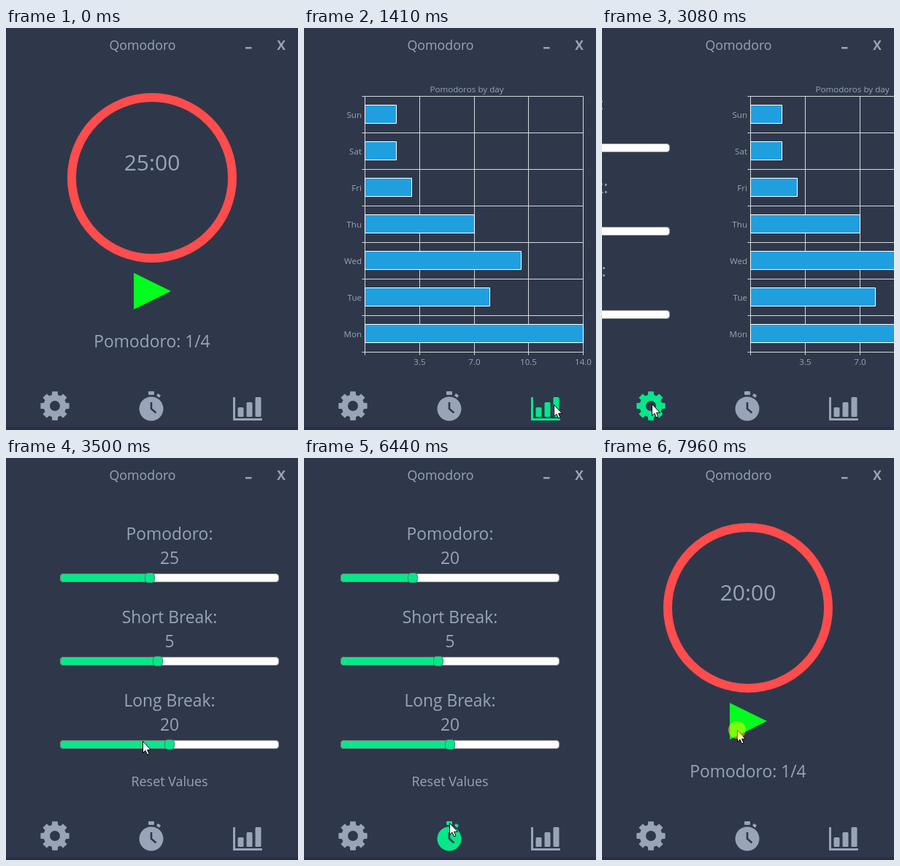
An HTML page with a canvas that plays this animation: 400x550 px, repeating every 8 s.

```html
<!DOCTYPE html>
<html lang="en">
<head>
<meta charset="utf-8">
<title>Qomodoro</title>
<style>
html, body { margin: 0; width: 100%; height: 100%; overflow: hidden; background: #2f384b; }
canvas { display: block; width: 400px; height: 550px; }
</style>
</head>
<body>
<canvas id="stage"></canvas>
<script>
const LOOP = 8000, W = 400, H = 550, SLIDE = 620;
const BG = '#2f384b', GREY = '#9aa4b8', GREEN = '#05e88a';
const FONT = '"Open Sans", "Noto Sans", sans-serif';
const canvas = document.getElementById('stage');
const ctx = canvas.getContext('2d');
const scale = window.devicePixelRatio || 1;
canvas.width = W * scale;
canvas.height = H * scale;

const eases = {
  lin: p => p,
  in: p => p * p,
  out: p => 1 - (1 - p) ** 2,
  both: p => p * p * (3 - 2 * p),
  hold: p => p < 1 ? 0 : 1
};

// Pointer path: time, x, y, easing of the way there
const path = [
  [470, 354, 552, 'lin'], [810, 342, 515, 'out'],
  [2240, 342, 515, 'hold'], [2630, 67, 515, 'both'],
  [3040, 67, 515, 'hold'], [3500, 187, 388, 'in'],
  [3730, 207, 193, 'lin'], [4290, 174, 164, 'out'],
  [4590, 174, 164, 'hold'], [5040, 155, 164, 'both'],
  [5180, 153, 164, 'hold'], [5580, 151, 164, 'hold'],
  [5680, 150, 164, 'hold'], [5830, 150, 164, 'hold'],
  [6420, 199, 499, 'both'], [7430, 199, 499, 'hold'],
  [7760, 185, 372, 'both']
];
const presses = [[1150, 1210], [2940, 3028], [4590, 5830], [6510, 6597], [7960, LOOP]];
// Page changes: time, from, to
const slides = [[1210, 1, 2], [3028, 2, 0], [6596, 0, 1]];

function pointer(t) {
  if (t < path[0][0]) return null;
  const i = path.findIndex(k => k[0] > t);
  if (i < 0) return path.at(-1).slice(1, 3);
  const [t0, x0, y0] = path[i - 1], [t1, x1, y1, ease] = path[i];
  const p = eases[ease]((t - t0) / (t1 - t0));
  return [x0 + (x1 - x0) * p, y0 + (y1 - y0) * p];
}

function outBack(p) {
  const s = 1.70158, u = p - 1;
  return u * u * ((s + 1) * u + s) + 1;
}

function text(str, x, y, size, align = 'center', weight = 400) {
  ctx.font = `${weight} ${size}px ${FONT}`;
  ctx.textAlign = align;
  ctx.fillStyle = GREY;
  ctx.fillText(str, x, y);
}

function box(x, y, w, h, r, fill, stroke) {
  ctx.beginPath();
  ctx.roundRect(x, y, w, h, r);
  ctx.fillStyle = fill;
  ctx.fill();
  if (stroke) {
    ctx.strokeStyle = stroke;
    ctx.lineWidth = 1;
    ctx.stroke();
  }
}

function disc(x, y, r, fill) {
  ctx.beginPath();
  ctx.arc(x, y, r, 0, 2 * Math.PI);
  ctx.fillStyle = fill;
  ctx.fill();
}

function polygon(points, fill) {
  ctx.beginPath();
  points.forEach(([x, y]) => ctx.lineTo(x, y));
  ctx.closePath();
  ctx.fillStyle = fill;
  ctx.fill();
}

function slider(label, value, frac, y) {
  const x = Math.round(57 + 286 * frac);
  text(label, 200, y - 52, 22.8);
  text(value, 200, y - 19, 22.8);
  box(50.5, y - 5.5, 299, 11, 4, '#fff', '#999');
  box(50.5, y - 5.5, x - 50, 11, 4, GREEN, '#777');
  box(x - 6.5, y - 6.5, 13, 13, 4, GREEN, '#4f7d6c');
}

function settingsPage(minutes) {
  slider('Pomodoro:', minutes, (minutes - 1) / 59, 164);
  slider('Short Break:', 5, 4 / 9, 278);
  slider('Long Break:', 20, 0.5, 392);
  text('Reset Values', 200, 449, 17.9);
}

function timerPage(minutes) {
  ctx.beginPath();
  ctx.arc(200, 205, 110, 0, 2 * Math.PI);
  ctx.lineWidth = 12;
  ctx.strokeStyle = '#ff4c4c';
  ctx.stroke();
  text(minutes + ':00', 200, 195, 30);
  polygon([[175, 335], [226, 360], [175, 385]], '#00ff1e');
  text('Pomodoro: 1/4', 200, 437, 22.8);
}

function chartPage() {
  const left = 60.5, top = 93.5, right = 359.5, bottom = 443.5;
  text('Pomodoros by day', 200, 88, 11.6);
  ctx.beginPath();
  for (let i = 0; i < 5; i++) {
    const x = Math.floor(left + i * 74.75) + 0.5;
    ctx.moveTo(x, top);
    ctx.lineTo(x, bottom + 4);
    if (i) text((i * 3.5).toFixed(1), x, 461, 11.6);
  }
  for (let i = 0; i < 8; i++) {
    ctx.moveTo(left - 4, top + 50 * i);
    ctx.lineTo(right, top + 50 * i);
  }
  ctx.strokeStyle = '#d5d8dd';
  ctx.lineWidth = 1;
  ctx.stroke();
  const days = { Sun: 2, Sat: 2, Fri: 3, Thu: 7, Wed: 10, Tue: 8, Mon: 14 };
  Object.entries(days).forEach(([day, count], i) => {
    box(left, 105.5 + 50 * i, Math.round(count * 299 / 14), 25, 0, '#209fdf', '#fff');
    text(day, 56, 123 + 50 * i, 11.6, 'right');
  });
}

function gearIcon(color) {
  const points = [];
  for (let i = 0; i < 8; i++) {
    for (const [r, turn] of [[15.5, -0.27], [20, -0.19], [20, 0.19], [15.5, 0.27]]) {
      const a = i * Math.PI / 4 + turn;
      points.push([67 + r * Math.cos(a), 517 + r * Math.sin(a)]);
    }
  }
  polygon(points, color);
  disc(67, 517, 7, BG);
}

function watchIcon(color) {
  disc(199, 521, 16.5, color);
  box(195, 497, 8, 5, 1, color);
  polygon([[208, 500], [212, 502.5], [210, 506], [206, 503]], color);
  ctx.beginPath();
  ctx.moveTo(199, 512);
  ctx.lineTo(199, 521);
  ctx.lineTo(205.5, 526.5);
  ctx.strokeStyle = BG;
  ctx.lineWidth = 2.6;
  ctx.stroke();
}

function barsIcon(color) {
  box(311, 505, 3, 32, 1, color);
  box(311, 534, 40, 3, 1, color);
  [519, 512, 505].forEach((y, i) => box(317.5 + 12 * i, y, 8, 532 - y, 1.5, color));
}

const icons = [[47, 497, 87, gearIcon], [182, 497, 216, watchIcon], [311, 505, 351, barsIcon]];

function drawPointer([x, y]) {
  const shape = [[0.5, 0.5], [0.5, 16.5], [4, 13.2], [6.6, 19], [9, 18], [6.6, 12.3], [11.5, 12.3]];
  polygon(shape.map(([dx, dy]) => [x + dx, y + dy]), '#fff');
  ctx.strokeStyle = '#000';
  ctx.lineWidth = 1;
  ctx.stroke();
}

function drawPages(t, minutes) {
  const pages = [settingsPage, timerPage, chartPage];
  const show = (i, dx) => {
    ctx.save();
    ctx.translate(Math.round(dx), 0);
    pages[i](minutes);
    ctx.restore();
  };
  const slide = slides.findLast(s => s[0] <= t);
  if (!slide) return show(1, 0);
  const [start, from, to] = slide;
  const p = Math.min((t - start) / SLIDE, 1);
  const dir = Math.sign(to - from), done = outBack(p);
  if (p < 1) show(from, -dir * W * done);
  show(to, dir * W * (1 - done));
}

function draw(t) {
  ctx.setTransform(scale, 0, 0, scale, 0, 0);
  ctx.fillStyle = BG;
  ctx.fillRect(0, 0, W, H);
  ctx.fillStyle = '#292f43';
  ctx.fillRect(0, 546, W, 4);

  text('Qomodoro', 187, 30, 17.8);
  text('X', 377, 30, 17.4, 'center', 700);
  ctx.fillRect(328, 26, 8.5, 2.5);

  const dragX = pointer(Math.min(Math.max(t, 4590), 5680))[0];
  const minutes = Math.round(1 + 59 * (dragX - 57) / 286);
  drawPages(t, minutes);

  const at = pointer(t);
  for (const [x0, y0, x1, icon] of icons) {
    const hover = at && at[0] >= x0 && at[0] <= x1 && at[1] >= y0 && at[1] <= 537;
    icon(hover ? GREEN : GREY);
  }
  if (!at) return;
  const tip = at.map(Math.round);
  drawPointer(tip);
  if (presses.some(([down, up]) => t >= down && t < up)) {
    disc(...tip, 12, 'rgba(255, 255, 0, 0.48)');
  }
}

function tick() {
  draw(performance.now() % LOOP);
  requestAnimationFrame(tick);
}
tick();
</script>
</body>
</html>
```
